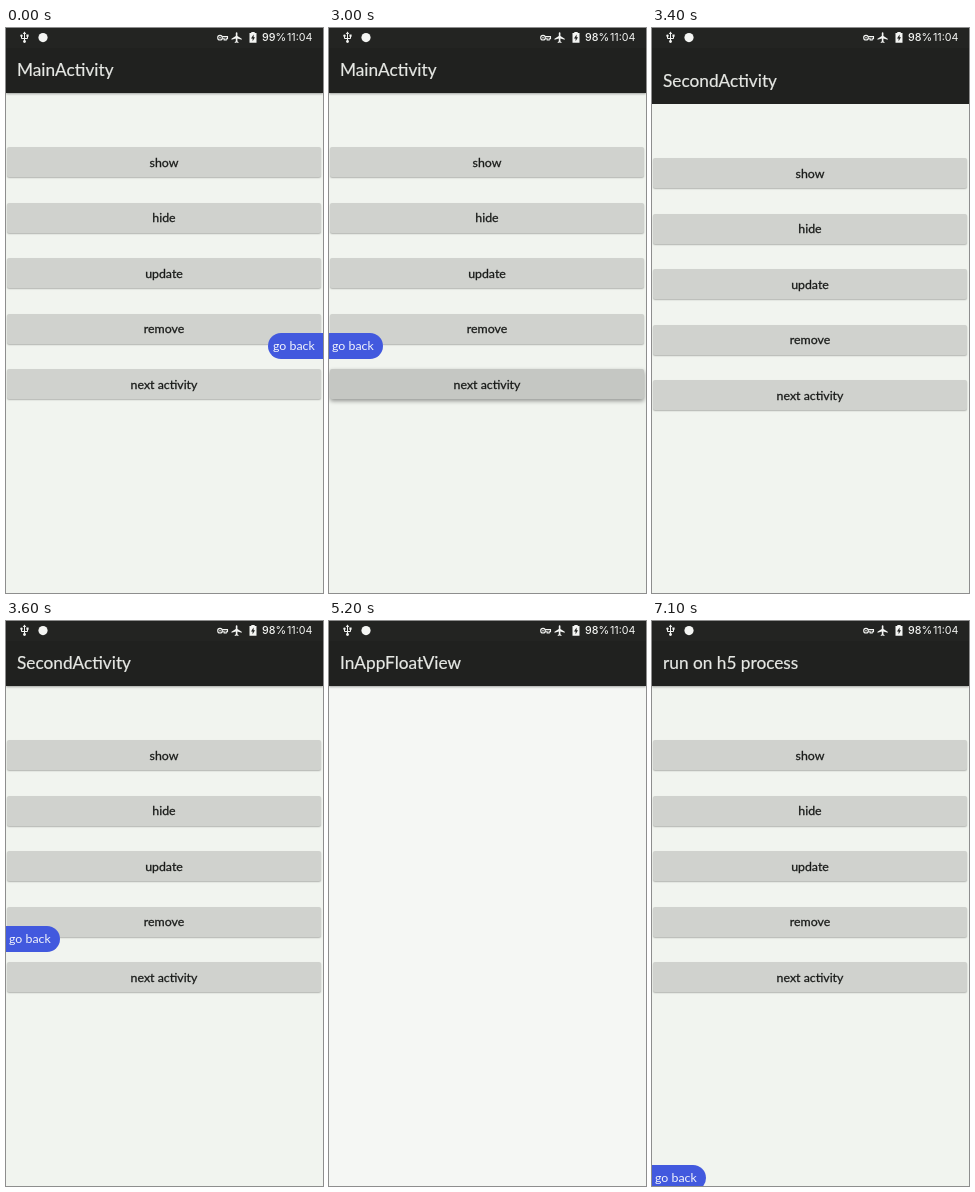
Recreate the animation shown at these times as an HTML page. Size 317x565 px, loop 8000 ms.

```html
<!DOCTYPE html>
<html lang="en">
<head>
<meta charset="utf-8">
<title>Floating button demo</title>
<style>
  html, body { margin: 0; width: 100%; height: 100%; overflow: hidden; }
  body { font: 12.35px Lato, "Open Sans", sans-serif; color: #191b19; }
  #stage { position: relative; width: 317px; height: 565px; overflow: hidden; background: var(--page); }
  #stage, #stage.neutral { --page: #f1f4ef; --key: #d0d2ce; }
  #stage.neutral { --page: #f4f4f4; --key: #d4d4d3; }
  #stage.splash { --page: #f5f7f4; }
  .splash button { display: none; }
  #bar, .header { position: absolute; left: 0; top: 0; width: 317px; height: 65px; background: #20211f; }
  #bar { box-shadow: 0 1px 2px #0005; }
  #screen { position: absolute; inset: 0; }
  #title {
    position: absolute; left: 11px; top: 30px; line-height: 24px; white-space: nowrap;
    font-size: 17.25px; color: #e6e8e4; -webkit-text-stroke: .2px;
  }
  button {
    position: absolute; left: 1px; width: 314px; height: 30px; padding: 0; border: 0;
    border-radius: 2px; background: var(--key); color: inherit; font: inherit; line-height: 29px;
    -webkit-text-stroke: .28px; box-shadow: 0 1px 1.5px #0004;
  }
  button.pressed { box-shadow: 0 2px 4px #0006; }
  #status { position: absolute; left: 0; top: 0; width: 317px; height: 20px; background: #232422; }
  #status span {
    position: absolute; top: 0; line-height: 19px; color: #f4f5f3;
    font-family: Inter, Roboto, sans-serif; font-size: 10.7px;
  }
  #level { left: 256px; font-weight: 500; }
  #clock { left: 281px; }
  #status svg { position: absolute; left: 0; top: 0; }
  #play {
    position: absolute; left: -3px; top: 10px; line-height: 20px; white-space: nowrap;
    font-family: "Noto Sans CJK SC", "Noto Sans CJK", sans-serif; font-size: 14px; color: #4663cc;
    text-shadow: 0 0 2px #080a12, 0 0 3px #080a12;
  }
  #pill {
    position: absolute; left: 0; width: 51px; height: 26px; padding-left: 3px; line-height: 25px;
    background: #4259de; color: #f3f5fc; border-radius: 0 13px 13px 0; white-space: nowrap;
  }
  #pill.right { left: 262px; width: 50px; padding-left: 5px; border-radius: 13px 0 0 13px; }
</style>
</head>
<body>
<div id="stage">
  <div id="bar"></div>
  <div id="screen">
    <div class="header"></div>
    <div id="title"></div>
  </div>
  <div id="status">
    <svg width="317" height="20" fill="#f4f5f3" stroke="none">
      <g fill="none" stroke="#f4f5f3" stroke-width="1">
        <path d="M18.5 5V13M15.5 8V10.5H21.5V8"/>
      </g>
      <path d="M18.5 3.5L20.2 6H16.8ZM20.4 6.5H22.6V8.7H20.4Z"/>
      <circle cx="15.5" cy="7.7" r="1.2"/>
      <circle cx="18.5" cy="13.5" r="1.4"/>
      <circle cx="37" cy="9.6" r="4.6"/>
      <g fill="none" stroke="#f4f5f3" stroke-width="1.1">
        <circle cx="214" cy="9.7" r="2.3"/>
        <path d="M216.2 8.6H221.5V10.8H220.2V12H218.2V10.8H216.2"/>
      </g>
      <circle cx="214" cy="9.7" r=".8"/>
      <path transform="translate(224.4 3.1) scale(.54)"
        d="M21 16v-2l-8-5V3.5c0-.8-.7-1.5-1.5-1.5S10 2.700 10 3.500V9l-8 5v2l8-2.500V19l-2 1.500V22l3.500-1 3.500 1v-1.500L13 19v-5.500l8 2.500z"/>
      <path d="M245.300 4H248.700V5H250.500V14.800H243.500V5H245.300Z"/>
      <path d="M247.600 6.500L245 10.500H246.600V13.300L249 9.200H247.600Z" fill="#232422"/>
    </svg>
    <span id="level"></span><span id="clock">11:04</span>
  </div>
  <div id="play">播放</div>
  <div id="pill">go back</div>
</div>
<script>
const LOOP = 8000;
const byId = id => document.getElementById(id);
const stage = byId('stage'), screen_ = byId('screen'), pill = byId('pill');

const keys = ['show', 'hide', 'update', 'remove', 'next activity'].map((label, i) => {
  const key = document.createElement('button');
  key.textContent = label;
  key.style.top = 119 + 55.6 * i + 'px';
  screen_.append(key);
  return key;
});
const nextKey = keys[4];

// Each step lists only what changes from the step before it.
const steps = [
  [0, { title: 'MainActivity', level: '99%', pill: 305, right: true, mode: '', play: false, press: '', shift: 0 }],
  [1300, { level: '98%', right: false, mode: 'neutral', play: true }],
  [2200, { mode: '', play: false }],
  [3000, { press: '#c5c7c3' }],
  [3100, { press: '#bbbdb9' }],
  [3200, { press: '#c7c9c5' }],
  [3300, { press: '', pill: null }],
  [3400, { title: 'SecondActivity', shift: 11 }],
  [3500, { shift: 0 }],
  [3600, { pill: 305 }],
  [4900, { press: '#c5c7c3' }],
  [5000, { press: '#bbbdb9' }],
  [5100, { press: '', pill: null }],
  [5200, { title: 'InAppFloatView', mode: 'splash' }],
  [5500, { title: 'run on h5 process', mode: '' }],
  [5600, { pill: 305 }],
  [6900, { pill: 384 }],
  [7000, { pill: 470 }],
  [7100, { pill: 544 }]
];
let last = {};
const states = steps.map(([at, change]) => ({ at, ...(last = { ...last, ...change }) }));

function draw(s) {
  stage.className = s.mode;
  byId('title').textContent = s.title;
  byId('level').textContent = s.level;
  byId('play').hidden = !s.play;
  screen_.style.transform = s.shift ? `translateY(${s.shift}px)` : '';
  nextKey.style.background = s.press;
  nextKey.className = s.press ? 'pressed' : '';
  pill.hidden = s.pill === null;
  pill.className = s.right ? 'right' : '';
  pill.style.top = s.pill + 'px';
}

let shown;
function tick() {
  const t = performance.now() % LOOP;
  const state = states.findLast(s => s.at <= t);
  if (state !== shown) draw(shown = state);
  requestAnimationFrame(tick);
}
tick();
</script>
</body>
</html>
```
